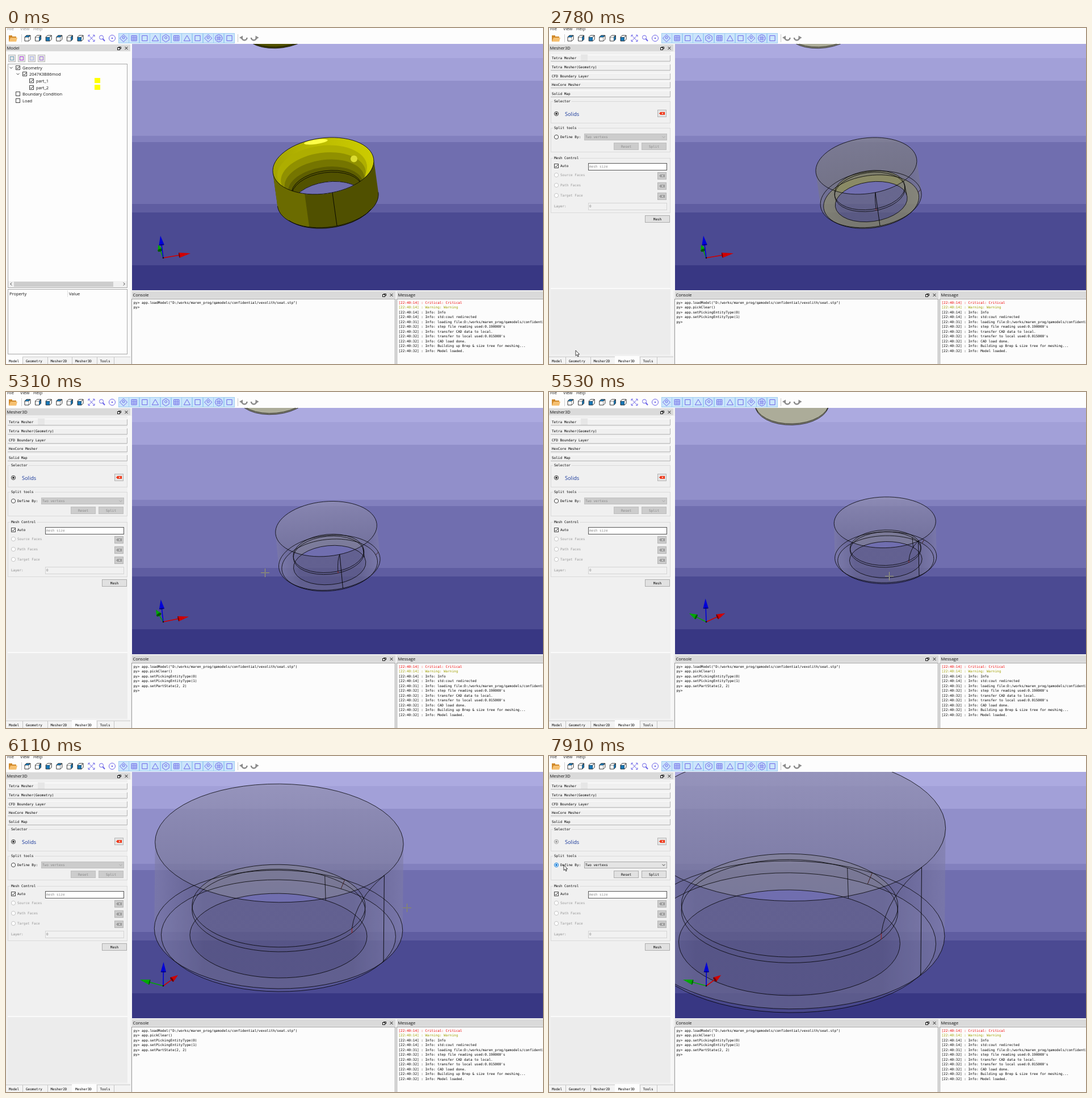
An HTML page with a canvas for the animation above (7.99 s loop, 946 by 592 pixels).

```html
<!DOCTYPE html>
<html lang="en">
<head>
<meta charset="utf-8">
<title>Mesher</title>
<style>
html, body { margin: 0; width: 100%; height: 100%; overflow: hidden; background: #f0f0f0 }
canvas { display: block }
</style>
</head>
<body>
<canvas id="stage" width="946" height="592"></canvas>
<script>
const g = document.getElementById('stage').getContext('2d');
const LOOP = 7990, TAU = Math.PI * 2, RAD = Math.PI / 180;
const MONO = '6px "DejaVu Sans Mono", monospace';
const SANS = '7.5px "Open Sans", "Noto Sans", sans-serif';
const BIG = '9.2px "Open Sans", "Noto Sans", sans-serif';
const lerp = (a, b, p) => a + (b - a) * p;
const part = (t, from, to) => Math.min(1, Math.max(0, (t - from) / (to - from)));

// ---- drawing helpers ----
function text(s, x, y, color = '#000', font = MONO, align = 'left') {
  g.font = font; g.fillStyle = color; g.textAlign = align;
  g.fillText(s, x, y);
}
function rect(x, y, w, h, color) { g.fillStyle = color; g.fillRect(x, y, w, h); }
function box(x, y, w, h, fill, edge) {
  rect(x, y, w, h, edge);
  rect(x + 1, y + 1, w - 2, h - 2, fill);
}
function trace(points) {
  g.beginPath();
  for (let i = 0; i < points.length; i += 2) g.lineTo(points[i], points[i + 1]);
}
function line(points, color = '#000', width = 1) {
  trace(points); g.strokeStyle = color; g.lineWidth = width; g.stroke();
}
function poly(points, color) { trace(points); g.fillStyle = color; g.fill(); }
function ngon(x, y, r, sides, turn = 0) {
  const p = [];
  for (let i = 0; i <= sides; i++) {
    const a = (i / sides + turn) * TAU;
    p.push(x + r * Math.sin(a), y - r * Math.cos(a));
  }
  return p;
}
function disc(x, y, r, fill, edge) {
  g.beginPath(); g.arc(x, y, r, 0, TAU);
  if (fill) { g.fillStyle = fill; g.fill(); }
  if (edge) { g.strokeStyle = edge; g.lineWidth = 1; g.stroke(); }
}
function clipped(path, draw, rule = 'nonzero') {
  g.save(); g.beginPath(); path(); g.clip(rule); draw(); g.restore();
}

// ---- widgets ----
function check(x, y, on) {
  box(x - 4, y - 4, 8, 8, '#fff', '#444');
  if (on) line([x - 2.5, y, x - .5, y + 2, x + 2.5, y - 2], '#222');
}
function radio(y, on, color = '#444') {
  disc(13, y, 3.6, '#fff', color);
  if (on) disc(13, y, 1.9, color);
}
function chevron(x, y, turn = 0, color = '#444') {
  g.save(); g.translate(x, y); g.rotate(turn * TAU);
  line([-2.5, -1.2, 0, 1.3, 2.5, -1.2], color);
  g.restore();
}
function button(s, x, y, off) {
  box(x, y, 44, 13, off ? '#ccc' : '#e1e1e1', off ? '#bfbfbf' : '#adadad');
  text(s, x + 22, y + 8.7, off ? '#888' : '#000', MONO, 'center');
}
function combo(s, x, y, w, off) {
  box(x, y, w, 12, off ? '#ccc' : '#e4e4e4', off ? '#bfbfbf' : '#a8a8a8');
  text(s, x + 2, y + 8.2, off ? '#888' : '#000');
  chevron(x + w - 6, y + 6, 0, off ? '#aaa' : '#444');
}
function field(s, x, y, fill = '#f1f1f1', edge = '#d4d4d4') {
  box(x, y, 208 - x, 13, fill, edge);
  text(s, x + 2, y + 8.3, '#888');
}
function group(s, y, bottom) {
  box(3, y, 211, bottom - y, '#f0f0f0', '#dadada');
  rect(7, y - 3, s.length * 3.62 + 4, 7, '#f0f0f0');
  text(s, 9, y + 2.2);
}
function eraser(y, on) {
  box(191, y, 16, 13, on ? '#e4e4e4' : '#ccc', '#b5b5b5');
  rect(196, y + 4, 8, 5, on ? '#f03010' : '#999');
  poly(ngon(196.5, y + 6.5, 3, 3, .75), on ? '#f03010' : '#999');
  for (const d of [-1.3, 1.3]) line([198.5, y + 6.5 - d, 201.5, y + 6.5 + d], '#eee');
}
function page(s, y) {
  rect(3, y - 6, 211, 1, '#fff');
  line([3, y + 5.5, 213.5, y + 5.5, 213.5, y - 5], '#b4b4b4');
  text(s, 5, y + 2.2);
}
function titleBar(s, x, y, w, buttonX) {
  rect(x, y, w, 12, '#dadada');
  text(s, x + 1.5, y + 9, '#111', SANS);
  if (!buttonX) return;
  box(buttonX - 1, y + 4, 5, 4, '#dadada', '#222');
  box(buttonX - 3, y + 5, 5, 5, '#dadada', '#222');
  for (const d of [-2.5, 2.5]) line([buttonX + 10.5, y + 6.5 - d, buttonX + 15.5, y + 6.5 + d], '#222');
}

// ---- tool bar ----
function cube(x, face) {
  const fills = ['#fff', '#fff', '#fff'];
  fills[face] = '#1878b8';
  const near = [x - 5, 16, x + 2, 16, x + 2, 23, x - 5, 23, x - 5, 16];
  const top = [x - 5, 16, x - 2, 13, x + 5, 13, x + 2, 16];
  const side = [x + 2, 16, x + 5, 13, x + 5, 20, x + 2, 23];
  [near, top, side].forEach((p, i) => { poly(p, fills[i]); line(p, '#222', .9); });
}
function toolBar(dim) {
  const ink = '#6c64e8';
  rect(0, 0, 946, 28, '#fdfdfd');
  ['File', 'View', 'Help'].forEach((s, i) => text(s, 2 + i * 23, 4, dim ? '#999' : '#222', SANS));
  rect(5, 13, 6, 3, '#d08a2c');
  rect(5, 15, 13, 9, '#d08a2c');
  poly([8, 17, 20, 17, 18, 24, 5, 24], '#f6c070');
  for (let i = 0; i < 6; i++) cube(38 + i * 18.6, (i + 1) % 3);
  for (let i = 0; i < 4; i++) {
    g.save(); g.translate(150.5, 18); g.rotate(i * TAU / 4);
    line([0, 0, 5, 5], ink); line([2.5, 5.5, 5.5, 5.5, 5.5, 2.5], ink);
    g.restore();
  }
  disc(168, 16.5, 3.5, null, ink); line([170.5, 19, 174, 23], ink, 2);
  disc(187, 18, 5.5, null, ink); disc(187, 18, 1.3, ink);
  // toggles: corners of each icon's outline
  [...'44436434484'].forEach((n, i) => {
    const x = 207 + i * 18.65, flat = n == 4 && i % 4 != 0;
    box(Math.round(x - 9.5), 9, 19, 18, '#cbe5fb', '#9fcdf2');
    line(ngon(x, n == 3 ? 19.5 : 18, 6.5, +n, flat ? 1 / 8 : 0), ink);
    if (i % 4 == 1) for (const d of [-1.5, 1.5]) {
      line([x - 4.5, 18 + d, x + 4.5, 18 + d], ink, .8);
      line([x + d, 13.5, x + d, 22.5], ink, .8);
    }
    if (i % 4 == 0) disc(x, 17, 2, null, ink);
  });
  for (const x of [27.5, 408.5]) line([x, 11, x, 25], '#ccc');
  for (const [x, d] of [[419, 1], [437.5, -1]]) {
    poly(ngon(x - 4 * d, 17, 4, 3, -d / 4), '#8a8a8a');
    g.beginPath(); g.arc(x + d, 17, 4.5, 0, Math.PI);
    g.lineWidth = 2.6; g.strokeStyle = '#8a8a8a'; g.stroke();
  }
}

// ---- left dock ----
function modelPanel() {
  rect(0, 28, 222, 564, '#fbfbfb');
  titleBar('Model', 0, 29, 219, 199);
  ['#6fa0b8', '#b040e0', '#a8b0e8', '#a070d8'].forEach((c, i) => {
    const x = 4 + Math.round(i * 17.3);
    box(x, 47, 13, 13, '#e6e6e6', '#bcbcbc');
    box(x + 3, 50, 7, 7, '#e6e6e6', c);
  });
  box(3, 63, 211, 395, '#fdfdfd', '#a8a8a8');
  const depths = [0, 1, 2, 2, 0, 0];
  ['Geometry', '2047K3B86mod', 'part_1', 'part_2', 'Boundary Condition', 'Load'].forEach((s, i) => {
    const x = 21 + depths[i] * 12, y = Math.round(69.5 + i * 11.7);
    if (i < 2) chevron(x - 12, y);
    check(x, y, i < 4);
    text(s, x + 8, y + 2.8, '#111', SANS);
    if (depths[i] == 2) rect(156, y - 5, 10, 9, '#ffff00');
  });
  rect(4, 446, 209, 11, '#f0f0f0');
  rect(14, 447, 175, 9, '#cdcdcd');
  chevron(9, 451, .25); chevron(208, 451, .75);
  box(3, 460, 211, 115, '#fdfdfd', '#a8a8a8');
  rect(108, 462, 1, 12, '#e0e0e0');
  text('Property', 6, 471, '#111', SANS);
  text('Value', 111, 471, '#111', SANS);
}
function mesherBase() {
  rect(0, 28, 222, 564, '#f0f0f0');
  rect(214, 42, 8, 535, '#f7f7f7');
  titleBar('Mesher3D', 0, 29, 219, 199);
  rect(3, 458, 211, 2, '#fafafa');
  rect(3, 460, 211, 115, '#ececec');
  page('Tetra Mesher', 53);
  rect(56, 47, 12, 11, '#e6e6e6');
}
function otherPages(y) {
  ['Tetra Mesher(Geometry)', 'CFD Boundary Layer', 'HexCore Mesher', 'Solid Map']
    .forEach((s, i) => page(s, y + Math.round(i * 15.6)));
}
function tetraPanel() {
  mesherBase();
  group('Selector', 66, 106);
  box(9, 76, 178, 25, '#d9d9d9', '#c2c2c2');
  line([14, 89, 24, 89], '#1c3a86', 1.2);
  chevron(23, 89, .75, '#1c3a86');
  text('Elem Sets', 28.5, 92.3, '#14295e', BIG);
  eraser(82, true);
  group('Parameters', 114, 199);
  check(13, 128); text('Max Tetra size:', 20, 130.3);
  field('0.0', 80, 123);
  text('3D Elem Type:', 9, 147.3); combo('Tetra', 80, 139, 128);
  text('Elem Quality:', 9, 163);
  combo('None', 9, 170, 59); field('', 80, 170);
  check(13, 190); text('2nd Order', 20, 192.5);
  button('Mesh', 169, 206);
  otherPages(522);
}
function solidPanel(t) {
  const split = t >= 7770;
  mesherBase();
  otherPages(69);
  group('Selector', 129, 168);
  if (t > 3670 && t < 4030) box(21, 138, 166, 25, '#f3f3f3', '#dedede');
  radio(151, true, split ? '#999' : '#333');
  text('Solids', 28, 154.5, '#17379a', BIG);
  eraser(144, true);
  group('Split tools', 176, 219);
  radio(192, split, split ? '#0a78d8' : '#444');
  text('Define By:', 20, 194.2);
  combo('Two vertexs', 62, 186, 146, !split);
  button('Reset', 114, 202, !split);
  button('Split', 163, 202, !split);
  group('Mesh Control', 229, 326);
  check(13, 243, true); text('Auto', 20, 245.3);
  field('mesh size', 69, 238, '#fff', '#555');
  ['Source Faces', 'Path Faces', 'Target Face'].forEach((s, i) => {
    radio(259 + i * 18, false, '#c4c4c4');
    text(s, 20, 261.2 + i * 18, '#999');
    eraser(254 + i * 18);
  });
  text('Layer:', 9, 316.3, '#888');
  field('0', 69, 308);
  button('Mesh', 169, 330);
}
function tabs(active) {
  let x = -1;
  rect(0, 579, 219, 13, '#f3f3f3');
  rect(0, 579, 219, 1, '#ccc');
  ['Model', 'Geometry', 'Mesher2D', 'Mesher3D', 'Tools'].forEach((s, i) => {
    const w = 7.5 + s.length * 4.5, on = i === active;
    if (on) rect(x, 578, w, 14, '#fdfdfd');
    rect(Math.round(x + w), 580, 1, 12, '#c4c4c4');
    text(s, x + 6, on ? 589.3 : 588.5);
    x += w;
  });
}

// ---- console and messages ----
const path = 'D:/works/maren_prog/qamodels/confidential/vexolith/seat.stp';
const log = `14] : Critical: Critical
14] : Warning: Warning
14] : Info: Info
14] : Info: std:cout redirected
31] : Info: loading file:${path}
32] : Info: step file reading used:0.190000's
32] : Info: transfer CAD data to local.
32] : Info: transfer to local used:0.015000's
32] : Info: CAD load done.
32] : Info: Building up Brep & size tree for meshing...
32] : Info: Model loaded.`.split('\n');
function docks(t) {
  rect(219, 462, 727, 130, '#f0f0f0');
  titleBar('Console', 222, 464, 464, 666);
  titleBar('Message', 689, 464, 257);
  box(221, 477, 465, 116, '#fcfcfc', '#999');
  box(688, 477, 260, 116, '#fcfcfc', '#999');
  const cmds = [`app.loadModel("${path}")`];
  if (t >= 2780) cmds.push('app.pickClear()', 'app.setPickingEntityType(0)', 'app.setPickingEntityType(1)');
  if (t >= 4790) cmds.push('app.setPartState(2, 2)');
  cmds.push('');
  cmds.forEach((s, i) => text('py> ' + s, 224.5, 486 + i * 8.45));
  log.forEach((s, i) => text('[22:40:' + s, 691.5, 486 + i * 8.45, ['#f00000', '#a0a000'][i]));
}

// ---- 3D view ----
// Radii and heights of the ring's circles
const RIM = 89.6, NECK = 62.5, FOOT = 63.9, BASE = 84.6;
const TOP = 76, LIP = 24.5, LIP2 = 20.7, CHAMFER = 5.1;
const viewport = () => g.rect(221, 28, 725, 434);
function bands() {
  [[28, '#acaae0'], [53, '#a2a0d8'], [93, '#918fca'], [190, '#8280be'], [201, '#706eaf'],
    [310, '#5f5da1'], [325, '#4b4a92'], [418, '#383783']].forEach(([y, c]) => rect(221, y, 725, 462 - y, c));
}
function view(t, spin) {
  const drift = spin ** 1.4;
  const x0 = lerp(567.7, 613.4, drift), y0 = lerp(306, 287.3, drift);
  const a = lerp(7.9, -.5, spin ** .6) * RAD, sn = Math.sin(a), cs = Math.cos(a);
  const k = lerp(.546, .477, spin), rise = Math.sqrt(1 - k * k);
  const seam = lerp(6, 58, spin);
  const notches = t < 5970 ? 0 : t < 6050 ? 1 : t < 6110 ? 2 : t < 6270 ? 4 : 5;
  const zoom = 1.25 ** notches;
  const place = (x, y) => [706 + (x - 706) * zoom, 267 + (y - 267) * zoom];
  const pt = (r, deg, h) => {
    const u = r * Math.sin(deg * RAD), v = r * k * Math.cos(deg * RAD) - h * rise;
    return place(x0 + u * cs + v * sn, y0 - u * sn + v * cs);
  };
  const arc = (r, h, from = 0, to = 360, back = false) =>
    g.ellipse(...pt(0, 0, h), r * zoom, r * k * zoom, -a, from * RAD, to * RAD, back);
  const fill = (color, path, rule = 'nonzero') => { g.beginPath(); path(); g.fillStyle = color; g.fill(rule); };
  const stroke = () => { g.strokeStyle = '#000'; g.lineWidth = .8; g.stroke(); };
  const edge = (...p) => { g.beginPath(); arc(...p); stroke(); };
  const wall = (from, to) => { arc(RIM, TOP, from, to); arc(RIM, CHAMFER, to, from, true); };
  const mouth = () => arc(RIM, TOP);
  const ramp = (from, to, ...colors) => {
    const r = g.createLinearGradient(...from, ...to);
    colors.forEach((c, i) => r.addColorStop(i / (colors.length - 1), c));
    return r;
  };
  const left = pt(RIM, -90, TOP), right = pt(RIM, 90, TOP);
  const solid = t < 2780, gray = t >= 4790;

  // upper part, mostly out of view
  const px = lerp(483, 400, spin), py = lerp(-1, 34, spin);
  fill(solid ? '#505000' : 'rgba(172,172,130,.75)', () => g.ellipse(...place(px, py), 65 * zoom, 36 * zoom, -a, 0, TAU));
  stroke();
  g.beginPath(); g.ellipse(...place(px, py - 2), 65 * zoom, 36 * zoom, -a, 0, Math.PI); stroke();

  if (solid) {
    fill('#505000', () => arc(BASE, 0));
    fill('#505000', () => wall(0, 180));
    fill('#6b6b00', () => wall(116, 180));
    clipped(mouth, () => {
      fill(ramp(left, right, '#a4a400', '#bcbc00', '#cccc00'), mouth);
      ['#aeae00', '#909000', '#757500', '#5e5e00'].forEach((c, i) => {
        const p = .22 * (i + 1);
        fill(c, () => g.ellipse(lerp(555, 564, p), lerp(243, 285.7, p), lerp(84, 64, p), lerp(48, 34, p), -a, 0, TAU));
      });
      fill('#ffff48', () => g.ellipse(546, 200.5, 21, 4, -a, 0, TAU));
      disc(613, 230.5, 6, '#dcdc30');
      fill('#525200', () => arc(NECK, LIP));
      clipped(() => arc(FOOT, 0), bands);
      edge(NECK, LIP); edge(NECK, LIP2); edge(FOOT, 0);
    });
    edge(RIM, CHAMFER, 0, 180);
    edge(BASE, 0, 30, 150);
  } else {
    const outsideFoot = () => { viewport(); arc(FOOT, 0); };
    clipped(mouth, () => clipped(outsideFoot, () => {
      fill(ramp(pt(RIM, 180, TOP), pt(RIM, 0, TOP), ...(gray
        ? ['rgba(144,142,176,.7)', 'rgba(112,111,146,.7)'] : ['rgba(126,126,136,.72)', 'rgba(114,114,116,.72)'])), mouth);
      fill(gray ? 'rgba(128,130,132,.35)' : 'rgba(136,136,80,.5)', () => arc(NECK, LIP));
    }, 'evenodd'));
    const skin = gray ? 'rgba(92,90,130,.68)' : 'rgba(98,98,122,.62)';
    const side = gray ? 'rgba(126,124,166,.6)' : 'rgba(120,120,136,.6)';
    fill(ramp(left, right, side, skin, skin, skin, skin, side), () => wall(0, 180));
    fill(gray ? 'rgba(134,132,172,.22)' : 'rgba(152,152,96,.5)', () => { arc(BASE, 0); g.closePath(); arc(FOOT, 0); }, 'evenodd');
    for (const p of [[NECK, LIP], [NECK, LIP2], [FOOT, 0], [BASE, 0], [RIM, CHAMFER]]) edge(...p);
    g.beginPath(); g.moveTo(...pt(RIM, seam, TOP));
    g.quadraticCurveTo(...pt(66, seam, 50), ...pt(NECK, seam, LIP)); stroke();
    line([...pt(NECK, seam, LIP), ...pt(NECK, seam, LIP2)], '#a02020');
    line([...pt(NECK, seam + 90, LIP2), ...pt(FOOT, seam + 90, 0)], '#000', .8);
    line([...pt(RIM, seam + 90, CHAMFER), ...pt(BASE, seam + 90, 0)], '#402020');
  }
  edge(RIM, TOP);
  line([...pt(RIM, seam, TOP), ...pt(RIM, seam, CHAMFER)], '#000', .9);
}
function axis(x, y, color, dark) {
  const ox = 277, oy = 405, bx = lerp(ox, x, .59), by = lerp(oy, y, .59);
  const len = Math.hypot(x - ox, y - oy), nx = (oy - y) / len * 4.6, ny = (x - ox) / len * 4.6;
  line([ox, oy, bx, by], color, 1.6);
  poly([bx + nx, by + ny, x, y, bx - nx, by - ny], color);
  g.beginPath(); g.ellipse(bx, by, 4.6, Math.max(1, 4.6 - len / 11), Math.atan2(ny, nx), 0, TAU);
  g.fillStyle = dark; g.fill();
}
function triad(spin) {
  axis(lerp(268, 236, spin), lerp(382, 394, spin), '#00a800', '#005800');
  axis(lerp(325, 303, spin), lerp(397, 386, spin), '#d00000', '#700000');
  axis(lerp(272, 277.5, spin), lerp(366, 363, spin), '#0000d8', '#000080');
  disc(277, 405, 1.3, '#111');
}

// ---- pointer: [start, end, x, y] of each move ----
const moves = [[60, 270, 295, 289], [500, 1020, 118, 581], [1160, 1240, 133, 583], [1540, 1680, 111, 488],
  [1980, 2640, 47, 568], [3000, 3300, 155, 292], [3530, 3750, 30, 150], [3750, 3960, 229, 187],
  [3960, 4260, 559, 305], [4340, 4480, 631, 315], [4940, 5240, 410, 316], [5240, 5670, 690, 328],
  [5670, 5830, 706, 267], [6950, 7690, 26, 192]];
function pointer(t) {
  if (t < 60) return;
  let x = 852, y = 549;
  for (const [from, to, mx, my] of moves) {
    const p = part(t, from, to);
    x = lerp(x, mx, p); y = lerp(y, my, p);
  }
  x = Math.round(x); y = Math.round(y);
  if (t > 2780 && x > 221 && y < 461) {
    g.globalCompositeOperation = 'difference';
    rect(x - 7, y, 15, 1, '#fff');
    rect(x, y - 7, 1, 15, '#fff');
    g.globalCompositeOperation = 'source-over';
    return;
  }
  const shape = [x, y, x, y + 9.5, x + 2.2, y + 7.5, x + 3.8, y + 11, x + 5.2, y + 10.3, x + 3.8, y + 7, x + 6.6, y + 7, x, y];
  poly(shape, '#fff'); line(shape, '#111', .8);
}

function draw(t) {
  const spin = part(t, 5260, 5670);
  rect(0, 0, 946, 592, '#f0f0f0');
  clipped(viewport, () => { bands(); view(t, spin); triad(spin); });
  toolBar(t < 1380);
  if (t < 1380) modelPanel();
  else if (t < 2780) tetraPanel();
  else solidPanel(t);
  tabs(t < 1380 ? 0 : 3);
  docks(t);
  pointer(t);
}
const start = performance.now();
function frame() {
  draw((performance.now() - start) % LOOP);
  requestAnimationFrame(frame);
}
frame();
</script>
</body>
</html>
```
